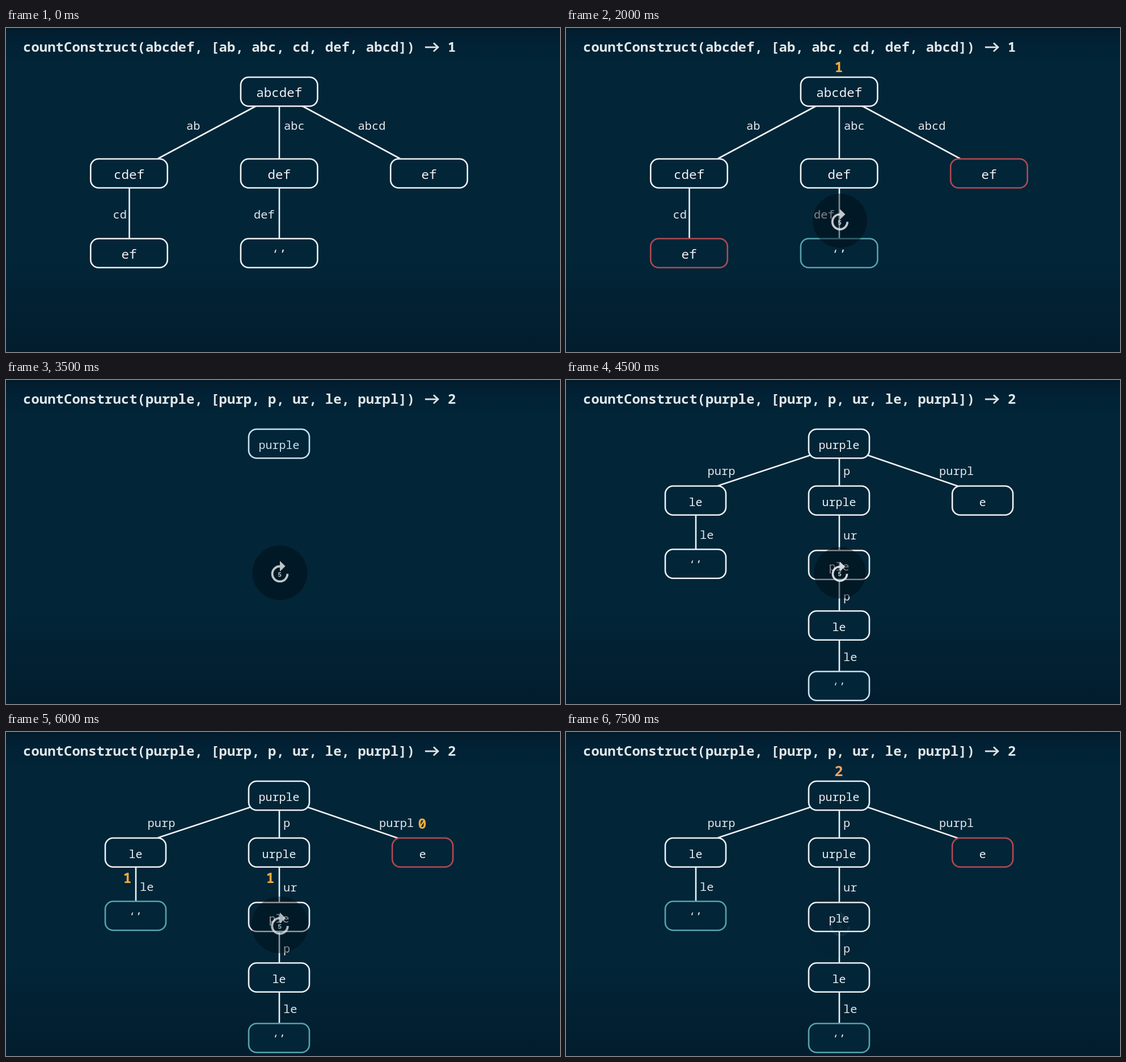
These frames come from a looping animation (977x573 px, 8000 ms). An HTML page with a canvas:

```html
<!DOCTYPE html>
<html lang="en">
<head>
<meta charset="utf-8">
<title>countConstruct</title>
<style>
html, body { margin: 0; width: 100%; height: 100%; overflow: hidden; background: #022538; }
canvas { display: block; }
</style>
</head>
<body>
<canvas id="stage" width="977" height="573"></canvas>
<script>
const ctx = document.getElementById('stage').getContext('2d');
const MONO = '"Noto Sans Mono", "DejaVu Sans Mono", monospace';
const BG = '#022538', WHITE = '#eef2f3', FRESH = '#c9e3f0';
const RED = '#b04a52', TEAL = '#57a3ae', ORANGE = '#f2ab3c', PEACH = '#f0a26a';
const STEP = 500, STEPS = 16, STROKE = 2.6;

// Radius of the skip badge in each step; it fades as it grows
const badgeSize = [0, 55, 40, 46, 48, 53, 51, 48.5, 47, 45.5, 47, 46, 50, 45, 50, 58];

function text(str, x, y, size, color = WHITE, align = 'center', weight = 500) {
  ctx.font = `${weight} ${size}px ${MONO}`;
  ctx.textAlign = align;
  ctx.fillStyle = color;
  ctx.fillText(str, x, y);
}

function line(...pts) {
  ctx.beginPath();
  for (let i = 0; i < pts.length; i += 2) ctx.lineTo(pts[i], pts[i + 1]);
  ctx.stroke();
}

function edge(x1, y1, x2, y2, label, lx, ly) {
  ctx.strokeStyle = WHITE;
  ctx.lineWidth = STROKE;
  line(x1, y1, x2, y2);
  text(label, lx, ly, 20.4, '#e3e9eb', 'left');
}

function box(x, y, w, size, label, color = WHITE, dy = 35) {
  ctx.beginPath();
  ctx.roundRect(x - w / 2, y, w, 51.3, 14);
  ctx.fillStyle = BG;
  ctx.fill();
  ctx.strokeStyle = color;
  ctx.lineWidth = STROKE;
  ctx.stroke();
  text(label, x, y + dy, size, color === FRESH ? FRESH : WHITE);
}

const count = (n, x, y, color = ORANGE) => text(n, x, y + 9, 25, color, 'center', 700);

function background() {
  const g = ctx.createLinearGradient(0, 0, 0, 573);
  g.addColorStop(0, '#021a29');
  g.addColorStop(0.03, '#022033');
  g.addColorStop(0.11, BG);
  g.addColorStop(0.72, BG);
  g.addColorStop(1, '#021d2d');
  ctx.fillStyle = g;
  ctx.fillRect(0, 0, 977, 573);
}

function title(args, result) {
  const color = '#e2e7e8';
  text(`countConstruct(${args})`, 30, 42, 24, color, 'left', 600);
  if (!result) return;
  ctx.strokeStyle = color;
  ctx.lineWidth = 2.8;
  line(739, 34, 762, 34);
  line(754, 26.5, 762, 34, 754, 41.5);
  text(result, 779, 42, 24, color, 'left', 600);
}

function firstTree(step) {
  const done = step >= 2;
  const node = (x, y, label, color) => box(x, y, 135.5, 22.5, label, color);
  const dead = done ? RED : WHITE;
  edge(441, 138, 268, 231, 'ab', 318, 180);
  edge(482, 138, 482, 231, 'abc', 490, 180);
  edge(522.5, 138, 695, 231, 'abcd', 620.5, 180);
  edge(217.5, 282, 217.5, 373, 'cd', 188.5, 337);
  edge(482, 282, 482, 373, 'def', 437, 337);
  node(481.7, 87, 'abcdef');
  node(217, 231.5, 'cdef');
  node(481.7, 231.5, 'def');
  node(746, 231.5, 'ef', dead);
  node(217, 372.5, 'ef', dead);
  node(481.7, 372.5, '‘’', done ? TEAL : WHITE);
  if (step === 2) {
    count(0, 235, 347);
    count(1, 508, 347);
  }
  if (step === 3) {
    count(0, 217, 215);
    count(1, 508, 212);
  }
  if (step === 2 || step === 3) count(0, 745, 215);
  if (step === 4) count(1, 481, 69);
}

function secondTree(step) {
  const done = step >= 10;
  const node = (x, y, label, color, dy) => box(x, y, 107, 20, label, color, dy);
  if (step >= 8) {
    edge(431, 133, 268, 187, 'purp', 249.5, 168);
    edge(482, 138, 482, 188, 'p', 489, 168);
    edge(532, 133, 692, 188, 'purpl', 658, 168);
    node(228.5, 187.5, 'le');
    node(481.5, 187.5, 'urple');
    node(734.7, 187.5, 'e', done ? RED : WHITE);
  }
  node(481.5, 87, 'purple', step === 7 ? FRESH : WHITE);
  if (step >= 9) {
    edge(229, 239, 229, 300, 'le', 236, 281);
    edge(482, 239, 482, 302, 'ur', 489, 282);
    edge(482, 353, 482, 409, 'p', 489, 390);
    edge(482, 460, 482, 516, 'le', 489, 497);
    node(228.5, 299.5, '‘’', done ? TEAL : WHITE, 33);
    node(481.5, 301.5, 'ple');
    node(481.5, 408.5, 'le');
    node(481.5, 515.5, '‘’', done ? TEAL : FRESH, 33);
  }
  if (step >= 10 && step <= 12) {
    count(1, 214, 258);
    count(1, 466, 472 - (step - 10) * 107);
    count(0, 734, 162);
  }
  if (step >= 13) count(2, 481, 69, PEACH);
}

function badge(r) {
  if (!r) return;
  const fade = 1 - ((r - 40) / 18.5) ** 2.5;
  ctx.save();
  ctx.translate(483, 341);
  ctx.scale(r / 53, r / 53);
  ctx.globalAlpha = 0.5 * fade;
  ctx.fillStyle = '#000a10';
  ctx.beginPath();
  ctx.arc(0, 0, 53, 0, 7);
  ctx.fill();
  ctx.globalAlpha = 0.95 * fade;
  ctx.strokeStyle = ctx.fillStyle = '#e8ecee';
  ctx.lineWidth = 4.2;
  ctx.beginPath();
  ctx.arc(0, 2, 14.6, 0, -Math.PI / 2);
  ctx.stroke();
  ctx.beginPath();
  ctx.moveTo(0, -23);
  ctx.lineTo(10.5, -12.8);
  ctx.lineTo(0, -2.5);
  ctx.fill();
  ctx.font = '700 12.5px Roboto, sans-serif';
  ctx.textAlign = 'center';
  ctx.fillText('5', -0.5, 7.5);
  ctx.restore();
}

function draw(now) {
  const step = Math.floor(now / STEP) % STEPS;
  background();
  if (step < 5) {
    title('abcdef, [ab, abc, cd, def, abcd]', '1');
    firstTree(step);
  } else {
    title('purple, [purp, p, ur, le, purpl]', step > 5 ? '2' : '');
    if (step >= 7) secondTree(step);
  }
  badge(badgeSize[step]);
}

let start;
function tick(now) {
  start ??= now;
  draw(now - start);
  requestAnimationFrame(tick);
}
draw(0);
requestAnimationFrame(tick);
</script>
</body>
</html>
```
